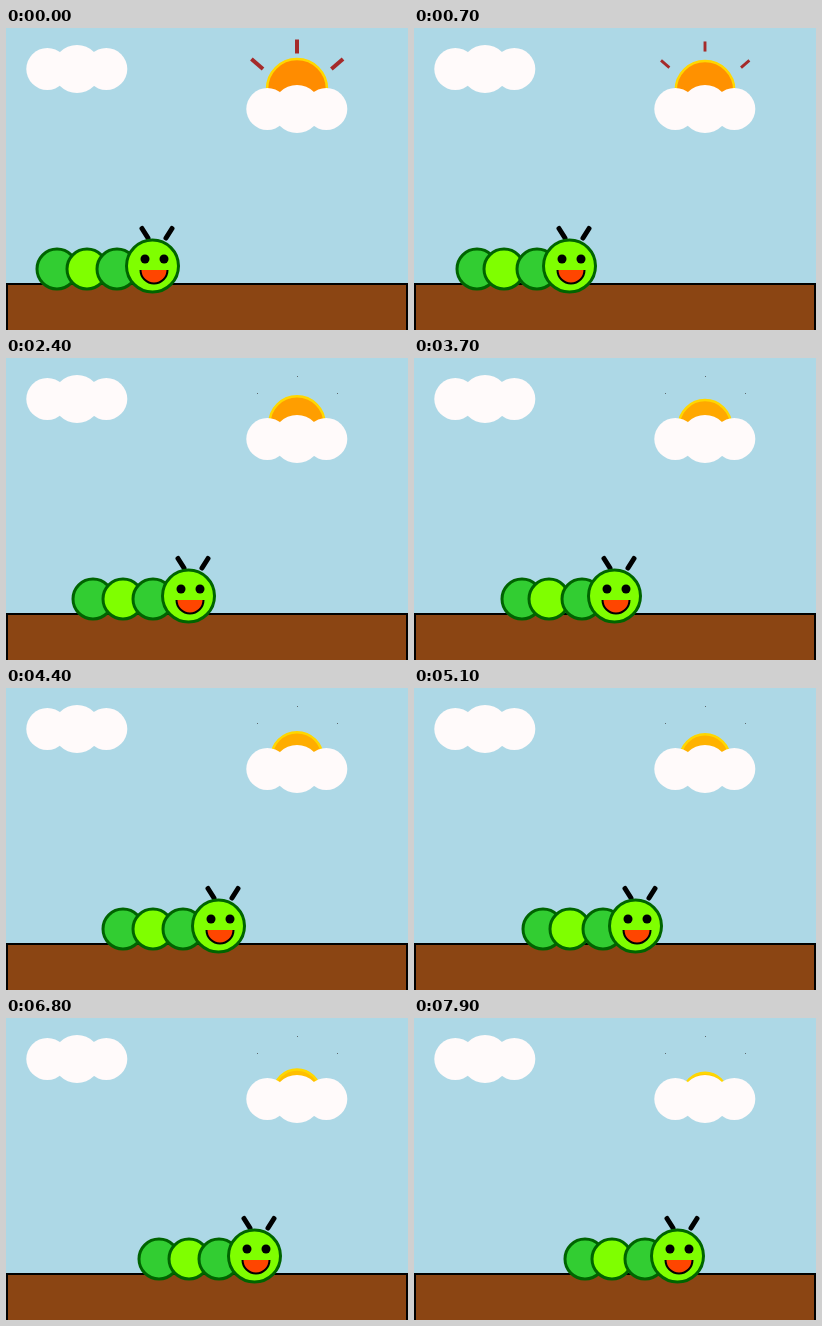
These frames come from a looping animation (402 px wide and 302 px high, 8000 ms). An HTML page with a canvas:

```html
<!DOCTYPE html>
<html lang="en">
<head>
<meta charset="utf-8">
<title>Caterpillar</title>
<style>
html, body { margin: 0; width: 100%; height: 100%; overflow: hidden; }
canvas { display: block; }
</style>
</head>
<body>
<canvas id="stage" width="402" height="302"></canvas>
<script>
const ctx = document.getElementById('stage').getContext('2d');
const LOOP = 8000, STEP = 100;

function circle(x, y, r, fill, stroke, width) {
  ctx.beginPath();
  ctx.arc(x, y, r, 0, Math.PI * 2);
  ctx.fillStyle = fill;
  ctx.fill();
  if (!stroke) return;
  ctx.strokeStyle = stroke;
  ctx.lineWidth = width;
  ctx.stroke();
}

function line(x1, y1, x2, y2, color, width, cap) {
  ctx.beginPath();
  ctx.moveTo(x1, y1);
  ctx.lineTo(x2, y2);
  ctx.strokeStyle = color;
  ctx.lineWidth = width;
  ctx.lineCap = cap;
  ctx.stroke();
}

function cloud(x, y) {
  for (const [dx, r] of [[-29.7, 21], [29.3, 21], [0, 24]]) circle(x + dx, y, r, '#fffafa');
}

// Each ray shrinks about its centre until only a speck is left.
function ray(x, y, dx, dy, scale) {
  if (scale > 0.05) {
    line(x - dx * scale, y - dy * scale, x + dx * scale, y + dy * scale,
      '#a52a2a', Math.max(1, 4 * scale), 'butt');
  } else {
    ctx.fillStyle = '#5f6b70';
    ctx.fillRect(Math.floor(x), Math.floor(y - 0.5), 1, 1);
  }
}

function sun(n) {
  const scale = Math.max(0, 1 - n / 25);
  ray(291, 18.5, 0, 7, scale);
  ray(251.2, 36, 5.8, 5, scale);
  ray(331.2, 36, -5.8, 5, scale);
  circle(291, 61 + 0.2 * n, 30 - 0.1 * n,
    `rgb(255, ${Math.round(140 + 0.75 * n)}, 0)`, '#ffd700', 2.5);
}

function head(x) {
  for (const side of [-1, 1]) {
    line(x + 5 + side * 9, 210, x + 5 + side * 15, 200.5, '#000', 5, 'round');
  }
  circle(x + 0.5, 238, 26, '#7fff00', '#006400', 3);
  circle(x - 7, 231, 4.5, '#000');
  circle(x + 12, 231, 4.5, '#000');
  ctx.beginPath();
  ctx.arc(x + 2, 242, 13.5, 0, Math.PI);
  ctx.fillStyle = '#ff4500';
  ctx.fill();
  ctx.strokeStyle = '#000';
  ctx.lineWidth = 2;
  ctx.lineCap = 'butt';
  ctx.stroke();
}

// Alternate parts of the body take turns to move 3 pixels.
function caterpillar(n) {
  const lead = 3 * Math.ceil(n / 2), lag = 3 * Math.floor(n / 2);
  const segment = (x, fill) => circle(x, 241, 20, fill, '#006400', 3);
  segment(51 + lead, '#32cd32');
  segment(81 + lag, '#7fff00');
  segment(111 + lead, '#32cd32');
  head(146 + lag);
}

function draw(now) {
  const n = Math.floor(now % LOOP / STEP);
  ctx.fillStyle = '#add8e6';
  ctx.fillRect(0, 0, 402, 302);
  sun(n);
  cloud(71, 41);
  cloud(291, 81);
  ctx.fillStyle = '#8b4513';
  ctx.fillRect(1, 256, 400, 50);
  ctx.strokeStyle = '#000';
  ctx.lineWidth = 2;
  ctx.strokeRect(1, 256, 400, 50);
  caterpillar(n);
}

const start = performance.now();
function tick() {
  draw(performance.now() - start);
  requestAnimationFrame(tick);
}
tick();
</script>
</body>
</html>
```
